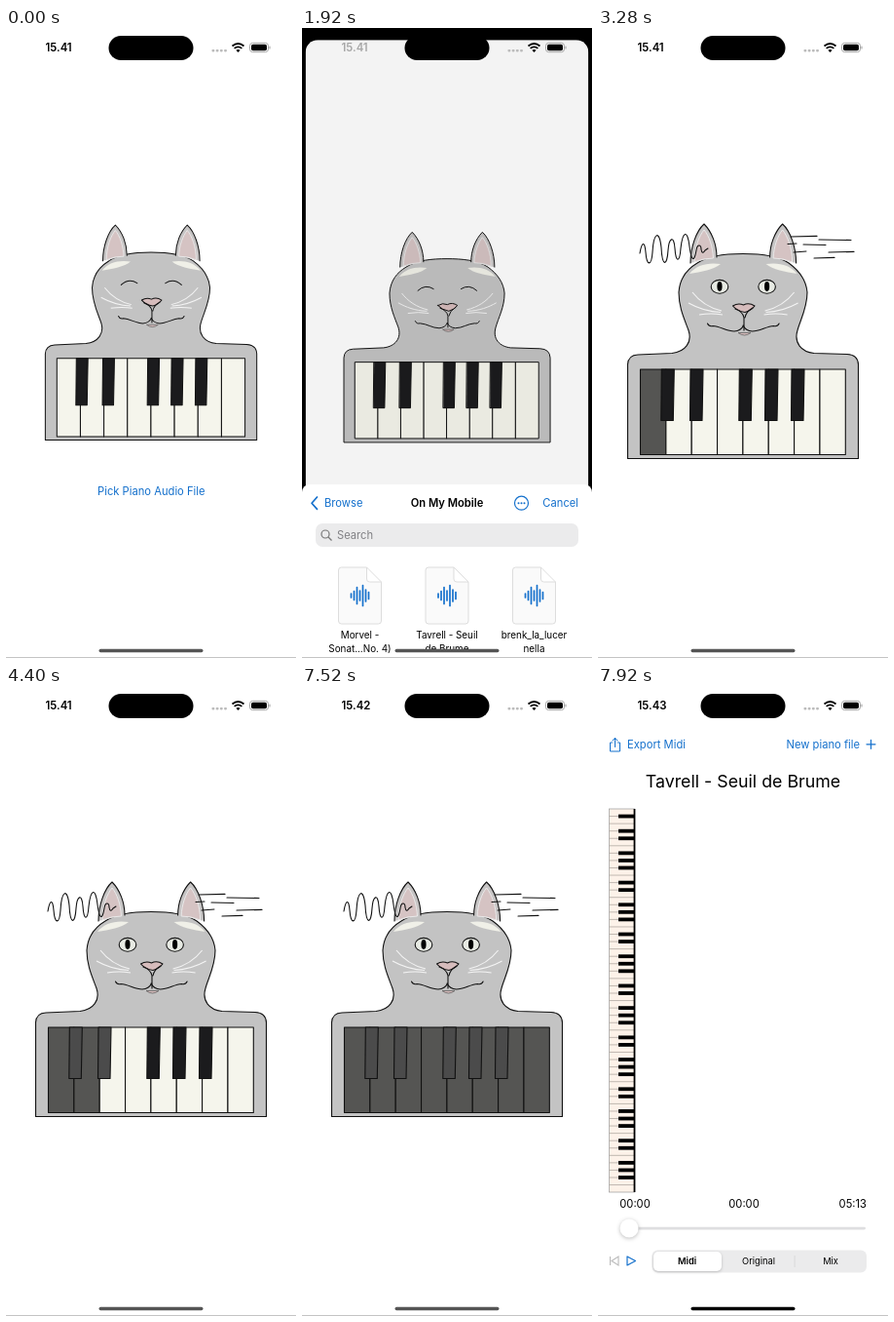
These frames come from a looping animation (298x646 px, 8 s). An HTML page:

```html
<!DOCTYPE html>
<html lang="en">
<head>
<meta charset="utf-8">
<style>
  html, body { margin: 0; width: 100%; height: 100%; overflow: hidden; background: #fff; }
  svg { display: block; width: 298px; height: 646px; font: 11.2px Inter, "Liberation Sans", sans-serif; }
  .ink { fill: none; stroke: #111; stroke-width: 1.1; stroke-linecap: round; stroke-linejoin: round; }
  .blue { fill: #1470cc; }
  .line { fill: none; stroke: #1470cc; stroke-width: 1.2; stroke-linecap: round; stroke-linejoin: round; }
  .mid { text-anchor: middle; }
  .bold { font-weight: 600; }
</style>
</head>
<body>
<svg id="stage" viewBox="0 0 298 646"></svg>
<script>
const LOOP = 8000;
const stage = document.getElementById('stage');
const range = n => [...Array(n).keys()];
const rect = (x, y, w, h, attrs = '') => `<rect x="${x}" y="${y}" width="${w}" height="${h}" ${attrs}/>`;
const path = (d, attrs = 'class="ink"') => `<path d="${d}" ${attrs}/>`;
const text = (x, y, s, attrs = '') => `<text x="${x}" y="${y}" ${attrs}>${s}</text>`;
const circle = (x, y, r, attrs) => `<circle cx="${x}" cy="${y}" r="${r}" ${attrs}/>`;
const both = s => s + `<g transform="translate(298.6) scale(-1 1)">${s}</g>`;

// Cat with piano keys
const whiteKey = i => rect(43.5 + i * 26.35, 350, 26.35, 87.5, 'class="ink" style="fill:#f5f5ec"');
const blackKey = x => path(`M${x} 350h13l-1 52.5h-12.5z`, 'class="ink" style="fill:#1b1b1d"');

function cat(open, closed) {
  const ear = path('M95 241C95 225 101 208 109 201C117 209 122 222 122 235', 'class="ink" style="fill:#c6c4c4"')
    + path('M99 240C99 225 104 213 109 207C114 213 118 224 118.5 236Q108 236 99 240Z', 'fill="#d5c3c3" stroke="#eee" stroke-width=".9"');
  const foldedEar = path('M96 238C98 247 108 257 120 260C125 252 124 243 122 236', 'class="ink" style="fill:#c3c3c3"');
  const eye = '<ellipse cx="125" cy="265.3" rx="8.8" ry="6.9" class="ink" style="fill:#e7eae3"/><ellipse cx="125" cy="265" rx="2.6" ry="4.9"/>';
  return path('M30.5 441.5V345Q31 335.5 41 335L76 333.5C90 332 97 322 93 310C89 299 83 287 83 271C84 256 92 247 102 241C114 233 132 231.5 149 231.5C166 231.5 184 233 196 241C207 249 214 259 215 271C215 287 208 299 205 310C201 323 209 332 222 333.5L256 334.5Q267 335 267.5 345V441.5Z', 'class="ink" style="fill:#c3c3c3"')
    + `<g class="${open}">${both(ear + eye)}</g>`
    + `<g class="${closed}">${both((closed === 'asleep' ? ear : foldedEar) + path('M115.5 268Q124 260 133.5 266'))}</g>`
    + both(path('M94 252C101 243 113 240 126 242C119 248 106 250 94 252Z', 'fill="#f0f0e8"')
      + path('M97 271C104 280 114 287 127 290M93 282C102 287 112 291 126 291.5M104 294Q116 292 128 294', 'fill="none" stroke="#f4f4f4" stroke-width="1.1"')
      + path('M112.5 303Q114 306.500 118 305.500C126 306 132 311 140 311Q147 310.500 149.500 305'))
    + path('M144 312.500Q150.500 317.500 157 312.500Z', 'fill="#d6bcbc" stroke="#555" stroke-width=".7"')
    + path('M138.5 285Q144 281.500 149.500 284Q155 281 161 285Q157 290 151 291.500Q143 290 138.500 285Z', 'class="ink" style="fill:#d6bcbc"')
    + path('M141 288Q149 291 150 297V310M159 287Q152 291 151 297')
    + `<g class="whites">${range(8).map(whiteKey).join('')}</g>`
    + `<g class="blacks">${[65.3, 95, 145.3, 172, 199].map(blackKey).join('')}</g>`;
}

const sounds = path('M43 231C45 219 48 218 49 230C50 245 55 244 56 230C57 210 63 206 65 225C66 245 71 245 72 228C73 215 78 212 79 226C80 242 84 240 85 226C87 208 92 206 94 224C96 240 99 240 101 228C102 221 106 222 106 227Q107 233 110 228L113 226')
  + path('M198 214l27-.6M227 217l33 .5M195 221.500l9-.5M211 222l23 .5M201 230l13-1M237 230l26-.6M222 236l21-.6');

// File picker sheet, drawn from its own top edge
function fileCell(x, first, second, time) {
  const bars = [4, 9, 17, 10, 21, 12, 7].map((h, i) => `M${x - 9 + i * 3} ${114 - h / 2}v${h}`).join('');
  return path(`M${x - 22} 88q0-3 3-3h26l15 15v40q0 3-3 3h-38q-3 0-3-3zM${x + 7} 85v12q0 3 3 3h12`, 'fill="#fafafa" stroke="#ddd"')
    + path(bars, 'class="line" style="stroke-width:1.7"')
    + `<g class="mid" font-size="9.9">${text(x, 158, first)}${text(x, 171.5, second)}${text(x, 184, time, 'fill="#888" font-size="8.5"')}</g>`;
}
const tab = (x, label, icon, color) => `<g fill="none" stroke="${color}">${icon}</g>` + text(x, 567, label, `class="mid" font-size="7.6" fill="${color}"`);
const folder = x => path(`M${x - 9} 542h6l2 2h10v11h-18z`, '');
const picker = path('M15.500 13l-5.500 6.200 5.500 6.200', 'class="line" style="stroke-width:1.7"')
  + text(23, 23.3, 'Browse', 'class="blue"') + text(149, 23.3, 'On My Mobile', 'class="mid bold"')
  + circle(225.5, 19.2, 7, 'class="line"') + [-3, 0, 3].map(d => circle(225.5 + d, 19.2, 1, 'class="blue"')).join('')
  + text(284, 23.3, 'Cancel', 'class="blue" text-anchor="end"')
  + rect(14, 40, 270, 24, 'rx="7" fill="#ebebec"') + circle(24, 51, 4, 'fill="none" stroke="#777" stroke-width="1.2"')
  + path('M27 54l3.500 3.500', 'stroke="#777" stroke-width="1.3"') + text(36, 56, 'Search', 'fill="#808084"')
  + fileCell(59.5, 'Morvel -', 'Sonat...No. 4)', '15.30') + fileCell(149, 'Tavrell - Seuil', 'de Brume', '15.28')
  + fileCell(238.5, 'brenk_la_lucer', 'nella', '15.29')
  + rect(0, 533, 298, .6, 'fill="#ddd"')
  + tab(50, 'Recents', circle(50, 548, 7, '') + path('M50 544v4h3', ''), '#999')
  + tab(149, 'Shared', folder(149), '#999') + tab(248, 'Browse', folder(248), '#1470cc');

// Player screen
const rowY = k => 126 + k * 7.56;
const keyboard = rect(11.5, 126, 26, 393, 'fill="#fdf2e9" stroke="#999" stroke-width=".7"')
  + range(51).map(k => path(`M11.5 ${rowY(k + 1)}h26`, 'stroke="#a79f99" stroke-width=".7"')
    + ([0, 2, 3, 5, 6].includes(k % 7) ? rect(21, rowY(k + 1) - 1.9, 16, 3.8) : '')).join('')
  + rect(36.6, 126, 1.8, 393);
const player = rect(0, 0, 298, 646, 'fill="#fff"')
  + path('M14.500 58h-2v9h10v-9h-2M17.500 62.500v-9M15 56l2.500-2.700 2.500 2.700', 'class="line" style="stroke-width:1"')
  + text(30, 64, 'Export Midi', 'class="blue"') + text(269, 64, 'New piano file', 'class="blue" text-anchor="end"')
  + path('M276 59.800h9M280.500 55.300v9', 'class="line"')
  + text(149, 104, 'Tavrell - Seuil de Brume', 'class="mid" font-size="17.8"') + keyboard
  + text(38, 535, '00:00', 'class="mid"') + text(150, 535, '00:00', 'class="mid"') + text(276, 535, '05:13', 'text-anchor="end"')
  + rect(30, 554.7, 245, 2.8, 'rx="1.4" fill="#dedee0"')
  + circle(32, 556, 9.5, 'fill="#fff" style="filter:drop-shadow(0 1.5px 2px #0004)"')
  + path('M12.500 585v9M21 585v9l-7-4.500z', 'fill="none" stroke="#bbb" stroke-width="1.1"')
  + path('M30 585v9l8.500-4.500z', 'class="line"')
  + rect(55.5, 578.5, 220.5, 23, 'rx="6" fill="#ebebec"')
  + rect(57, 580, 70, 20, 'rx="5" fill="#fff" style="filter:drop-shadow(0 1px 1.5px #0003)"')
  + rect(201.7, 584, .7, 12, 'fill="#d0d0d2"')
  + `<g class="mid" font-size="9.3">${text(91.5, 593, 'Midi', 'class="bold"')}${text(165, 593, 'Original')}${text(239, 593, 'Mix')}</g>`;

const status = text(40.5, 24.2, '15.41', 'id="clock" class="bold" font-size="11.4"')
  + '<g id="icons">' + range(4).map(i => rect(211.5 + i * 4.2, 22, 2.8, 2.4, 'rx=".8" fill="#bbb"')).join('')
  + path('M232.500 18.500q6-5 12 0M234.600 20.900q3.900-3 7.800 0', 'fill="none" stroke="currentColor" stroke-width="1.8"')
  + path('M236.400 22.700q2.100-1.500 4.200 0l-2.100 2.300z', 'fill="currentColor"')
  + rect(250.5, 15.3, 19, 9.4, 'rx="3" fill="none" stroke="#aaa"') + rect(252, 16.8, 16, 6.4, 'rx="1.8" fill="currentColor"')
  + rect(270.4, 18.4, 1.2, 3.2, 'rx=".6" fill="#aaa"') + '</g>'
  + rect(105.5, 8, 87, 25, 'rx="12.5"');

stage.innerHTML = `<clipPath id="corners">${rect(0, 0, 298, 660, 'id="corner"')}</clipPath>` + rect(0, 0, 298, 646)
  + '<g id="card" clip-path="url(#corners)">' + rect(0, 0, 298, 660, 'fill="#fff"')
  + `<g id="home"><g transform="translate(12.4 17.7) scale(.917)">${cat('hidden', 'asleep')}</g>`
  + text(149.3, 479.3, 'Pick Piano Audio File', 'class="mid blue"') + '</g>'
  + `<g id="work">${cat('awake', 'waiting')}<g class="awake">${sounds}</g></g>`
  + `<g id="player">${player}</g>` + rect(0, 0, 298, 660, 'id="dim"') + '</g>' + status
  + `<g id="sheet">${rect(0, 0, 298, 700, 'rx="8" fill="#fff"')}<g id="files">${picker}</g></g>`
  + rect(95.5, 636.8, 107, 3.4, 'id="bar" rx="1.7"') + rect(0, 645, 298, 1, 'fill="#c4c4c4"');

const $ = id => document.getElementById(id);
const show = (el, on) => el.style.display = on ? '' : 'none';
const fade = (id, a) => { $(id).style.opacity = a; show($(id), a > 0); };
const smooth = (t, start, length) => {
  const x = Math.min(1, Math.max(0, (t - start) / length));
  return x * x * (3 - 2 * x);
};
// Critically damped spring from 0 to 1
const spring = (t, start, rate) => {
  const z = Math.max(0, t - start) * rate;
  const v = 1 - (1 + z) * Math.exp(-z);
  return v > .996 ? 1 : v;
};
show(stage.querySelector('.hidden'), false);

const whites = [...stage.querySelectorAll('#work .whites rect')];
const blacks = [...stage.querySelectorAll('#work .blacks path')];
const whiteTimes = [3280, 3920, 4640, 5120, 5680, 6240, 7040, 7520];
const blackTimes = [3680, 4400, 5280, 6080, 6800];
const paint = (keys, times, t, on, off) => keys.forEach((k, i) => k.style.fill = t >= times[i] ? on : off);

function draw(t) {
  const p = spring(t, 700, .018) - spring(t, 1717, .012);
  const scale = 1 - .0814 * p;
  $('card').setAttribute('transform', `translate(${149 * (1 - scale)} ${41 * p}) scale(${scale})`);
  $('corner').setAttribute('rx', p > 0 ? 13 : 0);
  fade('dim', .16 * p);
  $('sheet').setAttribute('transform', `translate(0 ${646 - 597 * p})`);
  show($('sheet'), p > 0);
  fade('files', smooth(t, 1140, 370));

  const work = smooth(t, 2345, 310), done = smooth(t, 7550, 340);
  fade('home', 1 - work);
  fade('work', work);
  fade('player', done);
  stage.querySelectorAll('.awake').forEach(el => show(el, t >= 3040));
  show(stage.querySelector('.waiting'), t < 3040);
  paint(whites, whiteTimes, t, '#555553', '#f5f5ec');
  paint(blacks, blackTimes, t, '#4b4b4b', '#1b1b1d');

  const grey = Math.round(255 * Math.min(1, p * 2.2));
  $('clock').textContent = t < 4640 ? '15.41' : t < 7600 ? '15.42' : '15.43';
  $('clock').style.fill = `rgb(${grey},${grey},${grey})`;
  $('icons').style.color = p > .5 ? '#fff' : '#000';
  $('bar').style.fill = done > .5 ? '#000' : '#555';
}

const begin = performance.now();
function tick() {
  draw((performance.now() - begin) % LOOP);
  requestAnimationFrame(tick);
}
tick();
</script>
</body>
</html>
```
